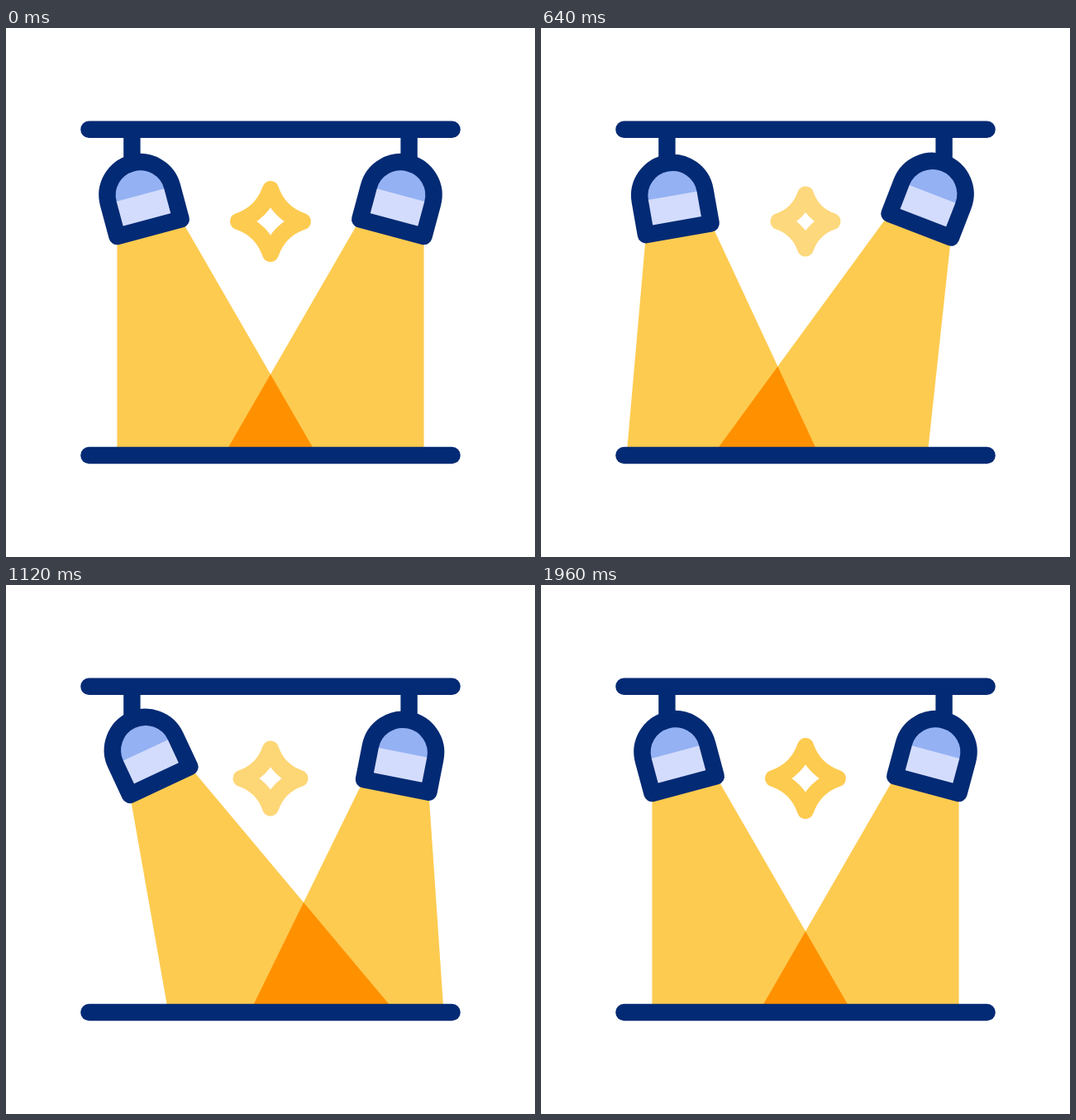
These frames come from a looping animation (640 px wide and 640 px high, 2000 ms). An HTML page with a canvas:

```html
<!DOCTYPE html>
<html lang="en">
<head>
<meta charset="utf-8">
<title>Stage lights</title>
<style>
  html, body { margin: 0; width: 100%; height: 100%; overflow: hidden; background: #fff; }
  canvas { display: block; width: 640px; height: 640px; }
</style>
</head>
<body>
<canvas id="stage" width="640" height="640"></canvas>
<script>
const ctx = document.getElementById('stage').getContext('2d');
const NAVY = '#032a74', YELLOW = '#fdcb50', ORANGE = '#ff9100', BLUE = '#94b1f3', PALE = '#d3dcfc';
const LOOP = 2000, STEP = 40, MOVE = 320, LAG = 280;
const STARTS = [36, 428, 856, 1288];
const PIVOT = { x: 152.4, y: 164.5 };
const SPREAD = 15, FLOOR = 517;
const rad = deg => deg * Math.PI / 180;

// Eased moves through the values, one per start time, with holds between.
function follow(time, values) {
  return STARTS.reduce((v, start, i) => {
    const p = Math.min(1, Math.max(0, (time - start) / MOVE));
    return v + (values[i + 1] - values[i]) * (1 - Math.cos(Math.PI * p)) / 2;
  }, values[0]);
}

const tilt = time => follow(time, [15, 10, 25, 10, 15]);

function line(x1, y1, x2, y2, cap = 'round') {
  ctx.lineCap = cap;
  ctx.beginPath();
  ctx.moveTo(x1, y1);
  ctx.lineTo(x2, y2);
  ctx.stroke();
}

function beam(angle, mirrored) {
  const c = Math.cos(rad(angle)), s = Math.sin(rad(angle));
  const path = new Path2D();
  const add = (x, y) => path.lineTo(mirrored ? 640 - x : x, y);
  const corner = side => [PIVOT.x + side * 40 * c + 80 * s, PIVOT.y - side * 40 * s + 80 * c];
  const foot = side => {
    const [x, y] = corner(side);
    return [x + (FLOOR - y) * Math.tan(rad(angle + side * SPREAD)), FLOOR];
  };
  add(...corner(-1));
  add(...corner(1));
  add(...foot(1));
  add(...foot(-1));
  path.closePath();
  return path;
}

function lamp(angle, mirrored) {
  ctx.save();
  if (mirrored) {
    ctx.translate(640, 0);
    ctx.scale(-1, 1);
  }
  ctx.strokeStyle = NAVY;
  line(PIVOT.x, 123, PIVOT.x, 163, 'butt');
  ctx.translate(PIVOT.x, PIVOT.y);
  ctx.rotate(-rad(angle));
  ctx.beginPath();
  ctx.arc(0, 39, 40, Math.PI, 0);
  ctx.lineTo(40, 80);
  ctx.lineTo(-40, 80);
  ctx.closePath();
  ctx.fillStyle = BLUE;
  ctx.fill();
  ctx.fillStyle = PALE;
  ctx.fillRect(-40, 39, 80, 41);
  ctx.stroke();
  ctx.restore();
}

function star(radius, alpha) {
  const bend = radius * 0.254;
  ctx.save();
  ctx.translate(320, 234);
  ctx.globalAlpha = alpha;
  ctx.strokeStyle = YELLOW;
  ctx.lineWidth = 20;
  ctx.beginPath();
  ctx.moveTo(0, -radius);
  ctx.quadraticCurveTo(bend, -bend, radius, 0);
  ctx.quadraticCurveTo(bend, bend, 0, radius);
  ctx.quadraticCurveTo(-bend, bend, -radius, 0);
  ctx.quadraticCurveTo(-bend, -bend, 0, -radius);
  ctx.closePath();
  ctx.stroke();
  ctx.restore();
}

function draw(time) {
  const left = tilt(time - LAG), right = tilt(time);
  const leftBeam = beam(left, false), rightBeam = beam(right, true);
  ctx.fillStyle = '#fff';
  ctx.fillRect(0, 0, 640, 640);
  ctx.lineWidth = 20.4;
  ctx.lineJoin = 'round';

  ctx.fillStyle = YELLOW;
  ctx.fill(leftBeam);
  ctx.fill(rightBeam);
  ctx.save();
  ctx.clip(leftBeam);
  ctx.fillStyle = ORANGE;
  ctx.fill(rightBeam);
  ctx.restore();

  star(follow(time, [39, 24, 35.5, 35.5, 39]), follow(time, [1, 0.62, 0.79, 0.79, 1]));
  lamp(left, false);
  lamp(right, true);
  ctx.strokeStyle = NAVY;
  line(100.4, 122.8, 539.6, 122.8);
  line(100.4, FLOOR, 539.6, FLOOR);
}

const begin = performance.now();
function tick() {
  const time = (performance.now() - begin) % LOOP;
  draw(Math.floor(time / STEP) * STEP);
  requestAnimationFrame(tick);
}
tick();
</script>
</body>
</html>
```
